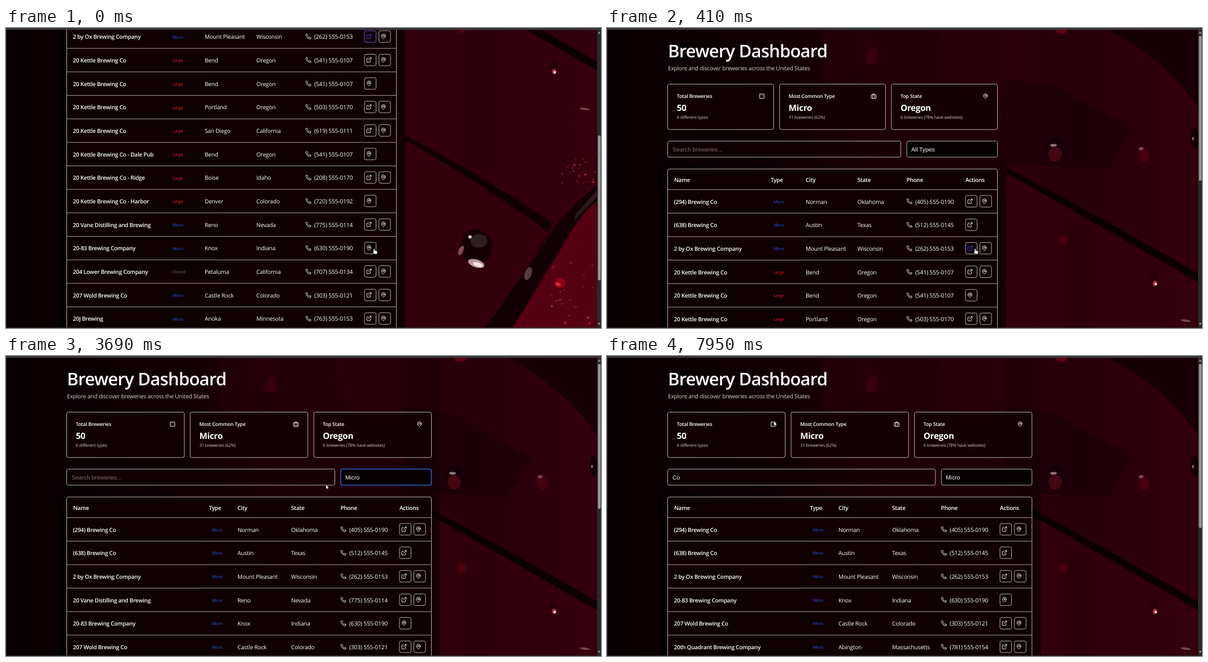
An HTML page that plays this animation: 1054 px wide and 532 px high, repeating every 8000 ms.

```html
<!DOCTYPE html>
<html lang="en">
<head>
<meta charset="utf-8">
<title>Brewery Dashboard</title>
<style>
html, body { margin: 0; width: 100%; height: 100%; overflow: hidden; background: #080001; }
svg { display: block; width: 100%; height: 100%; }
text { fill: #fff; font: 10.1px "Open Sans", "Noto Sans", sans-serif; letter-spacing: -.02em; white-space: pre; text-rendering: geometricPrecision; }
.b { font-weight: 600; font-size: 10px; letter-spacing: -.025em; }
.title { font-weight: 600; font-size: 31px; letter-spacing: -.025em; }
.sub { fill: #ddd3d5; }
.label { font-weight: 600; font-size: 8.8px; }
.value { font-weight: 700; font-size: 15.2px; }
.note { font-size: 7.6px; fill: #d3c8ca; }
.tag { font-size: 7.5px; }
.phone { font-size: 10.3px; }
.form { font: 10.3px "Liberation Sans", Arial, sans-serif; letter-spacing: 0; }
.box { stroke: #b9adaf; }
.rule { stroke: #a99da0; }
.icon { fill: none; stroke: #fff; stroke-width: 2.1; stroke-linecap: round; stroke-linejoin: round; }
</style>
</head>
<body>
<svg id="stage" viewBox="0 0 1054 532" xmlns="http://www.w3.org/2000/svg"></svg>
<script>
const LOOP = 8000, ROW = 41.67, LEFT = 107.5;
const TAGS = { Micro: '#2f55ea', Large: '#dc222c', Closed: '#5d6a86' };

// name, type, city, state, phone, buttons (w = website, m = map)
const BREWERIES = `(294) Brewing Co|Micro|Norman|Oklahoma|(405) 555-0190|wm
(638) Brewing Co|Micro|Austin|Texas|(512) 555-0145|w
2 by Ox Brewing Company|Micro|Mount Pleasant|Wisconsin|(262) 555-0153|wm
20 Kettle Brewing Co|Large|Bend|Oregon|(541) 555-0107|wm
20 Kettle Brewing Co|Large|Bend|Oregon|(541) 555-0107|m
20 Kettle Brewing Co|Large|Portland|Oregon|(503) 555-0170|wm
20 Kettle Brewing Co|Large|San Diego|California|(619) 555-0111|wm
20 Kettle Brewing Co - Dale Pub|Large|Bend|Oregon|(541) 555-0107|m
20 Kettle Brewing Co - Ridge|Large|Boise|Idaho|(208) 555-0170|wm
20 Kettle Brewing Co - Harbor|Large|Denver|Colorado|(720) 555-0192|m
20 Vane Distilling and Brewing|Micro|Reno|Nevada|(775) 555-0114|wm
20-83 Brewing Company|Micro|Knox|Indiana|(630) 555-0190|m
204 Lower Brewing Company|Closed|Petaluma|California|(707) 555-0134|wm
207 Wold Brewing Co|Micro|Castle Rock|Colorado|(303) 555-0121|wm
20J Brewing|Micro|Anoka|Minnesota|(763) 555-0153|wm
20th Quadrant Brewing Company|Micro|Abington|Massachusetts|(781) 555-0154|wm`
  .split('\n').map(line => line.split('|'));

const ICONS = {
  link: '<path d="M18 13v6a2 2 0 0 1-2 2H5a2 2 0 0 1-2-2V8a2 2 0 0 1 2-2h6M15 3h6v6M10 14L21 3"/>',
  pin: '<path d="M20 10c0 6-8 12-8 12s-8-6-8-12a8 8 0 0 1 16 0Z"/><circle cx="12" cy="10" r="3"/>',
  phone: '<path d="M22 16.9v3a2 2 0 0 1-2.2 2 19.8 19.8 0 0 1-8.6-3 19.5 19.5 0 0 1-6-6 19.8 19.8 0 0 1-3.1-8.7A2 2 0 0 1 4.1 2h3a2 2 0 0 1 2 1.7c.1 1 .4 1.9.7 2.8a2 2 0 0 1-.5 2.1L8.1 9.9a16 16 0 0 0 6 6l1.3-1.3a2 2 0 0 1 2.1-.4c.9.3 1.8.6 2.8.7a2 2 0 0 1 1.7 2Z"/>',
  panel: '<rect x="2.5" y="3" width="19" height="18" rx="2"/><path d="M7 8h.1M12 8h.1M17 8h.1M7 16h.1M17 16h.1"/>',
  case: '<rect x="2" y="6" width="20" height="15" rx="2"/><path d="M8 21V4a2 2 0 0 1 2-2h4a2 2 0 0 1 2 2v17"/>'
};

const text = (x, y, s, cls = '', extra = '') => `<text x="${x}" y="${y}" class="${cls}" ${extra}>${s}</text>`;
const box = (x, y, w, h, fill, extra = '') =>
  `<rect x="${x}" y="${y}" width="${w}" height="${h}" rx="3" fill="${fill}" class="box" ${extra}/>`;
const flat = (x, y, w, h, fill, extra = '') =>
  `<rect x="${x}" y="${y}" width="${w}" height="${h}" fill="${fill}" ${extra}/>`;
const path = (d, fill, opacity = 1) => `<path d="${d}" fill="${fill}" opacity="${opacity}"/>`;
const oval = (x, y, rx, ry, fill, opacity = 1, turn = 0) =>
  `<ellipse rx="${rx}" ry="${ry}" fill="${fill}" opacity="${opacity}" transform="translate(${x} ${y}) rotate(${turn})"/>`;
const icon = (name, cx, cy, extra = '') =>
  `<g class="icon" transform="translate(${cx - 5.2} ${cy - 5.2}) scale(.433)" ${extra}>${ICONS[name]}</g>`;

function backdrop() {
  let seed = 7;
  const rand = () => (seed = seed * 16807 % 2147483647) / 2147483647;
  let s = flat(0, 0, 1054, 1100, 'url(#base)');
  s += path('M380 0H470V60H450V45L430 120 380 190Z', '#3a000c', .3);
  s += path('M590 0H700V190L640 170 600 90Z', '#3d000e', .3);
  s += path('M456 60l12-24 8-4 6 28-8 6Z', '#5a0014', .5);
  s += path('M707 90L790 100 930 180 890 250 707 242Z', '#150005', .45);
  s += path('M880 0Q985 50 1054 150V0Z', '#100004', .75);
  s += path('M707 256L1054 456V655L960 735 707 571Z', '#3b000e', .45);
  s += path('M707 571L960 735 860 907H707Z', '#42000d', .4);
  s += path('M1054 660Q1015 700 990 750 960 810 895 910H1054Z', '#5c0013', .85);
  s += path('M707 247Q880 338 1054 439V455Q880 354 707 257Z', '#0d0003');
  s += path('M707 566Q850 640 968 722L962 738Q850 656 707 574Z', '#100003');
  s += path('M1054 648Q1000 692 975 725 930 795 845 912H893Q955 812 992 752 1018 702 1054 678Z', '#110004', .95);
  s += path('M1054 655L1010 705 1005 718 1054 668Z', '#5a4048', .4);

  s += oval(794, 215, 17, 21, '#12000a', .65) + oval(794, 224, 12, 13, '#5a0717', .7)
     + oval(791, 208, 6, 2.5, '#bb8f99', .8);
  s += oval(950, 224, 10, 14, '#48000f', .9, -20) + oval(946, 214, 4, 3, '#8e5b67', .7);
  s += oval(1041, 195, 7, 18, '#0d0003', .8) + oval(1038, 196, 2, 3, '#a98188', .7);
  s += oval(970, 447, 8, 13, '#250009') + oval(971, 453, 4, 5, '#a92b43') + oval(972, 454, 2.2, 2.2, '#fbdde2');
  s += oval(1025, 519, 9, 2, '#95636f', .7, 8) + oval(807, 376, 8, 9, '#57000f', .7);
  s += oval(805, 5, 10, 5, '#6b0013', .8);
  s += oval(833, 764, 28, 31, '#140004', .95) + oval(838, 753, 15, 12, '#34262b', .8)
     + oval(833, 793, 15, 7, '#caa2aa', .9, 18) + oval(836, 795, 9, 4, '#f5e4e6', 1, 15)
     + oval(806, 770, 4, 9, '#9c5a68', .8, 25) + oval(822, 746, 3, 3, '#d8bcc1');
  s += oval(925, 811, 6, 12, '#5e4149', .9, 20) + oval(981, 828, 10, 9, '#92001a') + oval(978, 830, 5, 3, '#cf3a4d', .8, 20);
  for (let i = 0; i < 26; i++)
    s += oval(985 + rand() * 60, 600 + rand() * 55, .8 + rand() * 2, .8 + rand() * 1.6, '#a3253d', .3 + rand() * .5);
  for (let i = 0; i < 22; i++)
    s += oval(965 + rand() * 80, 770 + rand() * 130, .8 + rand() * 2, .8 + rand() * 2, '#b52a42', .3 + rand() * .5);
  return s;
}

function tableRow(b, i, cols) {
  const y = 308 + i * ROW, base = y + 3.6, [name, type, city, state, phone, buttons] = b;
  const [typeX, cityX, stateX, phoneX, actX] = cols;
  let s = text(118.5, base, name, 'b') + text(typeX + 5, y + 2.7, type, 'tag', `style="fill:${TAGS[type]}"`)
    + text(cityX, base, city) + text(stateX, base, state)
    + icon('phone', phoneX + 5, y - .5) + text(phoneX + 15.5, base, phone, 'phone');
  [...buttons].forEach((kind, k) => {
    const x = actX + k * 25.6, hot = kind === 'w' && name[0] === '2' && i === 2 ? 'data-hot' : '';
    s += box(x, y - 11, 20.5, 20.5, '#100003', hot) + icon(kind === 'w' ? 'link' : 'pin', x + 8, y - .8, hot);
  });
  return s + `<path class="rule" d="M${LEFT} ${y + 20.3}H${cols.right}"/>`;
}

function scene(id, width, cols, list) {
  const right = cols.right = LEFT + width, cardW = (width - 20.8) / 3;
  let s = flat(92, 0, width + 31, 1100, 'url(#shade)');
  s += text(108, 52, 'Brewery Dashboard', 'title');
  s += text(108, 75.2, 'Explore and discover breweries across the United States', 'sub');
  [['Total Breweries', '50', '6 different types', 'panel'],
   ['Most Common Type', 'Micro', '31 breweries (62%)', 'case'],
   ['Top State', 'Oregon', '6 breweries (78% have websites)', 'pin']].forEach(([label, value, note, mark], i) => {
    const x = LEFT + i * (cardW + 10.4);
    s += box(x, 99.5, cardW, 80.5, '#120003', 'fill-opacity=".8"') + text(x + 16.2, 124, label, 'label')
      + text(x + 16.2, 147, value, 'value') + text(x + 16.2, 161.2, note, 'note')
      + icon(mark, x + cardW - 21, 121);
  });
  s += box(LEFT, 200.5, width - 171, 28.5, '#130004', 'fill-opacity=".6" data-search');
  s += box(right - 160.5, 200.5, 160.5, 28.5, '#070001', 'data-select');
  s += text(right - 152.5, 218.6, id === 'all' ? 'All Types' : 'Micro', 'form');
  s += box(LEFT, 250, width, 1000, '#110003', 'fill-opacity=".88"');
  ['Type', 'City', 'State', 'Phone', 'Actions'].forEach((h, i) => s += text(cols[i], 272.7, h, 'b'));
  s += text(119, 272.7, 'Name', 'b') + `<path class="rule" d="M${LEFT} 286.7H${right}"/>`;
  list.forEach((b, i) => s += tableRow(b, i, cols));
  return `<g id="${id}">${s}</g>`;
}

const micro = BREWERIES.filter(b => b[1] === 'Micro');
const OPTIONS = ['All Types', 'Micro', 'Large', 'Closed', 'Brewpub', 'Proprietor', 'Contract'];
const menu = box(531.5, 229, 159.5, 127, '#000', 'style="stroke:#3c3336"')
  + flat(532, 229.2, 158.5, 18, '#92bff8', 'id="pick"')
  + OPTIONS.map((o, i) => text(539.5, 241.7 + i * 18.05, o, 'form')).join('');

const stage = document.getElementById('stage');
stage.innerHTML = `<defs>
  <linearGradient id="base"><stop offset="0" stop-color="#080001"/><stop offset=".09" stop-color="#0c0002"/>
    <stop offset=".3" stop-color="#170005"/><stop offset=".45" stop-color="#2b000a"/><stop offset=".66" stop-color="#2b000a"/>
    <stop offset=".8" stop-color="#26000a"/><stop offset="1" stop-color="#34000d"/></linearGradient>
  <linearGradient id="shade" x2="0" y2="1"><stop offset=".05" stop-opacity=".18"/><stop offset=".2" stop-opacity=".3"/>
    <stop offset=".28" stop-opacity=".55"/><stop offset="1" stop-opacity=".65"/></linearGradient></defs>
  <g id="page">${backdrop()}
    ${scene('all', 584, [290, 352, 443.5, 530.5, 635], BREWERIES.slice(0, 15))}
    ${scene('micro', 646, [359.5, 410, 505, 592.5, 697], micro)}
    ${scene('found', 645.3, [359.5, 410, 505, 591.6, 696.1], micro.filter(b => b[0].includes('Co')))}
    ${text(116, 218.6, '', 'form', 'id="query"')}${flat(116, 209, 1, 12, '#fff', 'id="caret"')}
  </g>
  <g id="menu">${menu}</g>
  ${flat(1047, 0, 7, 532, '#29292b')}
  <path d="M1048.5 10l2.3-4 2.3 4ZM1048.5 523l2.3 4 2.3-4Z" fill="#9a9a9a"/>
  <rect id="thumb" x="1048.6" width="4.6" rx="2.3" fill="#9b9b9b"/>
  ${flat(0, 0, 1054, 2.2, '#303033')}${flat(0, 2, 1054, 1, '#4a4a4d')}
  ${flat(0, 3, 1, 529, '#2b2628')}${flat(0, 531, 1054, 1, '#2b2628')}
  <g id="pointer">
    <path id="arrow" d="M-2.5-4.5V4L-.6 2.4.8 5 2.2 4.3 1 1.8H3.4Z" fill="#fff" stroke="#000" stroke-width=".7"/>
    <path id="hand" d="M-2-5C-.9-5-.8-4-.8-3.4V-1.4L3-.6Q4.2-.3 4 1L3.2 5H-1.6L-4.4 1.2C-4.6.2-3.6 0-3 .8V-4Q-3-5-2-5Z" fill="#fff" stroke="#000" stroke-width=".6"/>
    <path id="beam" d="M-2-4H-.5L0-3.6.5-4H2M0-3.6V3.6M-2 4H-.5L0 3.6.5 4H2" fill="none" stroke="#c9c1c3" stroke-width=".9"/>
  </g>`;

// time, x, y, shape
const POINTER = [
  [0, 654, 396, 'hand'], [670, 430, 290, 'arrow'], [800, 241, 199, 'arrow'],
  [950, 270, 205, 'beam'], [1080, 340, 207, 'beam'], [1210, 420, 210, 'beam'], [1340, 500, 212, 'beam'],
  [1460, 540, 214, 'arrow'], [1590, 545, 215, 'arrow'], [1980, 546, 228, 'arrow'], [2110, 547, 252, 'arrow'], [2240, 548, 266, 'arrow'],
  [2650, 500, 250, 'arrow'], [2780, 430, 222, 'beam'], [2910, 409, 212, 'beam'], [3040, 440, 208, 'beam'],
  [3170, 520, 208, 'beam'], [3300, 612, 212, 'arrow'], [3430, 605, 216, 'arrow'], [3560, 590, 226, 'arrow'],
  [3690, 569, 232, 'arrow'], [3820, 552, 233, 'arrow'], [3950, 542, 226, 'beam'], [4080, 538, 221, 'beam'], [4210, 537, 220, 'beam'],
  [7140, 475, 176, 'arrow'], [7280, 298, 120, 'arrow']
];
const SCROLL = [[0, 375.5], [150, 151], [280, 42], [410, 0]];
const QUERY = [[0, 'Search breweries...', 116], [5950, 'C', 123], [6230, 'Co', 129]];
const CARET = [[0, 0], [4630, 1], [5160, 0], [5670, 1], [6760, 0], [7280, 1], [7560, 0]];
const HOT = [[0, '#5148ec', '#6a60d6'], [410, '#4a4cf0', ''], [670, '#7c7df3', ''], [800, '#c8c8fa', ''], [950, '', '']];
const SEARCH = [[0, ''], [4630, '#2c50a8'], [7560, '#4f68ad'], [7690, '#7f8bae'], [7820, '#a19fae'], [7950, '']];
const SELECT = [[0, ''], [1590, '#2c50a8'], [3560, '#2f62c8'], [4630, '']];

const at = (steps, t) => steps.findLast(step => step[0] <= t);
const $ = id => document.getElementById(id);
const show = (id, on) => $(id).style.display = on ? '' : 'none';
const setStroke = (query, color) => stage.querySelectorAll(query).forEach(el => {
  el.style.stroke = color;
  el.style.strokeWidth = color && query !== '[data-hot]' ? 1.5 : '';
});

function draw(t) {
  const [, scroll] = at(SCROLL, t);
  $('page').setAttribute('transform', `translate(0 ${-scroll})`);
  $('thumb').setAttribute('y', 14 + scroll * .47);
  $('thumb').setAttribute('height', t < 5950 ? 257 : 291);

  show('all', t < 2380);
  show('micro', t >= 2380 && t < 5950);
  show('found', t >= 5950);

  show('menu', t >= 1590 && t < 2380);
  const picked = t < 2110 ? 0 : 1;
  $('pick').setAttribute('y', 229.2 + picked * 18.05);
  $('menu').querySelectorAll('text').forEach((el, i) => el.style.fill = i === picked ? '#1d2c40' : '');

  const [, typed, caretX] = at(QUERY, t);
  $('query').textContent = typed;
  $('query').style.fill = t < 5950 ? '#7d7073' : '#fff';
  $('caret').setAttribute('x', caretX);
  show('caret', at(CARET, t)[1]);

  setStroke('[data-search]', at(SEARCH, t)[1]);
  setStroke('[data-select]', at(SELECT, t)[1]);
  const [, link, frame] = at(HOT, t);
  setStroke('#all rect[data-hot]', frame);
  stage.querySelector('#all rect[data-hot]').style.strokeWidth = 1;
  setStroke('#all g[data-hot]', link);
  stage.querySelector('#all g[data-hot]').style.strokeWidth = 2.1;

  const [, x, y, shape] = at(POINTER, t);
  $('pointer').setAttribute('transform', `translate(${x} ${y})`);
  ['arrow', 'hand', 'beam'].forEach(id => show(id, id === shape));
}

const start = performance.now();
function tick() {
  draw((performance.now() - start) % LOOP);
  requestAnimationFrame(tick);
}
tick();
</script>
</body>
</html>
```
